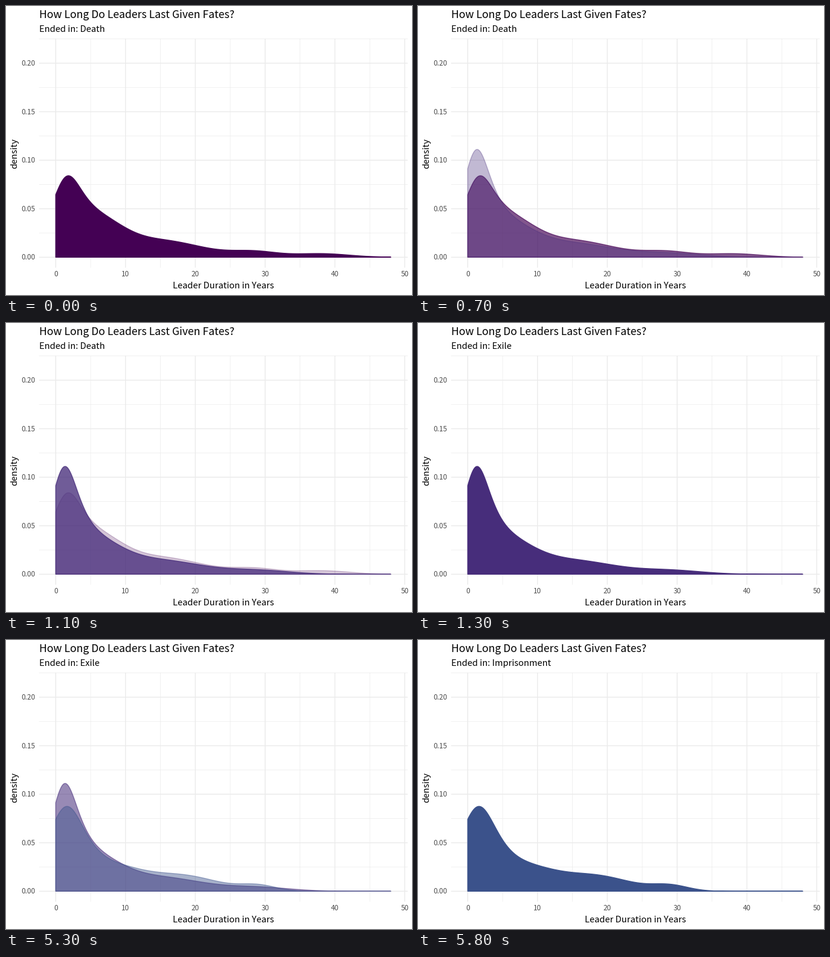
Animation, 672 px wide and 480 px high, one loop 8000 ms. Source, as a matplotlib script:

```python
import numpy as np
import matplotlib.pyplot as plt
from matplotlib.animation import FuncAnimation
from matplotlib.colors import to_rgba

W, H, DPI = 672, 480, 96
STEP_MS, FRAMES = 100, 80
FADE = 9                      # steps in one cross-fade
STARTS = (5, 50)              # first step of each cross-fade
LEFT, RIGHT, TOP, BOTTOM = 54.8, 664.8, 54.2, 434.6
X0, Y0 = 82.3, 417.3          # pixel position of the data origin
X_UNIT, Y_UNIT = 11.553, 1611.5
THICK, THIN = 1.42, .71       # line widths in pixels

plt.rcParams["font.family"] = ["Noto Sans CJK JP", "DejaVu Sans"]

# fate, colour, main peak, then the bumps of its tail: (height, centre, width)
FATES = [
    ("Death", "#440154", (.072, 1.5, 2.25),
     [(.0252, 6.4, 3.6), (.017, 15, 6), (.0053, 28.5, 3.3), (.0037, 38, 4)]),
    ("Exile", "#472D7B", (.097, 1.18, 1.97),
     [(.025, 5.8, 4), (.014, 15, 6), (.0039, 29, 4.6)]),
    ("Imprisonment", "#3B528B", (.0845, 1.5, 2.68),
     [(.0155, 8.9, 4), (.016, 18, 5.2), (.0056, 29, 2.6)]),
]


def px(year):
    return X0 + X_UNIT * year


def py(density):
    return Y0 - Y_UNIT * density


def density(x, peak, tail):
    """A pointed peak near zero with a tail of normal bumps."""
    a, m, s = peak
    return a / np.cosh((x - m) / s) + sum(
        a * np.exp(-((x - m) / s) ** 2 / 2) for a, m, s in tail)


fig = plt.figure(figsize=(W / DPI, H / DPI), dpi=DPI, facecolor="white")
ax = fig.add_axes([0, 0, 1, 1])
ax.set_xlim(0, W)
ax.set_ylim(H, 0)
ax.axis("off")


def rule(xs, ys, width):
    ax.plot(xs, ys, color="#EBEBEB", lw=width * 72 / DPI, snap=False,
            solid_capstyle="butt", zorder=1)


def label(x, y, text, size, color="black", **kw):
    return ax.text(x, y, text, fontsize=size, color=color, va="baseline", **kw)


for k in range(11):
    rule([px(5 * k)] * 2, [TOP, BOTTOM], THIN if k % 2 else THICK)
for k in range(10):
    rule([LEFT, RIGHT], [py(.025 * k)] * 2, THIN if k % 2 else THICK)

for year in range(0, 51, 10):
    label(px(year), 449, str(year), 8.8, "#4D4D4D", ha="center")
for k in range(5):
    label(48, py(.05 * k) + 4, f"{.05 * k:.2f}", 8.8, "#4D4D4D", ha="right")

label(55, 20, "How Long Do Leaders Last Given Fates?", 13.2)
subtitle = label(55, 43, "", 11)
label(359.8, 469, "Leader Duration in Years", 11, ha="center")
label(18, 244.4, "density", 11, ha="center", rotation=90, rotation_mode="anchor")

years = np.linspace(0, 48, 400)
areas = []
for i, (_, _, peak, tail) in enumerate(FATES):
    outline = np.column_stack([np.r_[px(years), px(48), px(0)],
                               np.r_[py(density(years, peak, tail)), Y0, Y0]])
    area = plt.Polygon(outline, closed=True, lw=THICK * 72 / DPI,
                       joinstyle="round", snap=False, zorder=3 + i)
    areas.append(ax.add_patch(area))


def draw(n):
    # progress counts whole states; its fraction is the cross-fade
    progress = sum(np.clip(n - s + 1, 0, FADE) / FADE for s in STARTS)
    for i, area in enumerate(areas):
        alpha = max(0, 1 - abs(progress - i))
        shade = to_rgba(FATES[i][1], alpha)
        area.set_facecolor(shade)
        area.set_edgecolor(shade)
        area.set_visible(alpha > 1e-6)
    subtitle.set_text("Ended in: " + FATES[int(progress + 1e-6)][0])
    return [*areas, subtitle]


anim = FuncAnimation(fig, draw, frames=FRAMES, interval=STEP_MS,
                     repeat=True, repeat_delay=0, blit=False)
plt.show()
```
